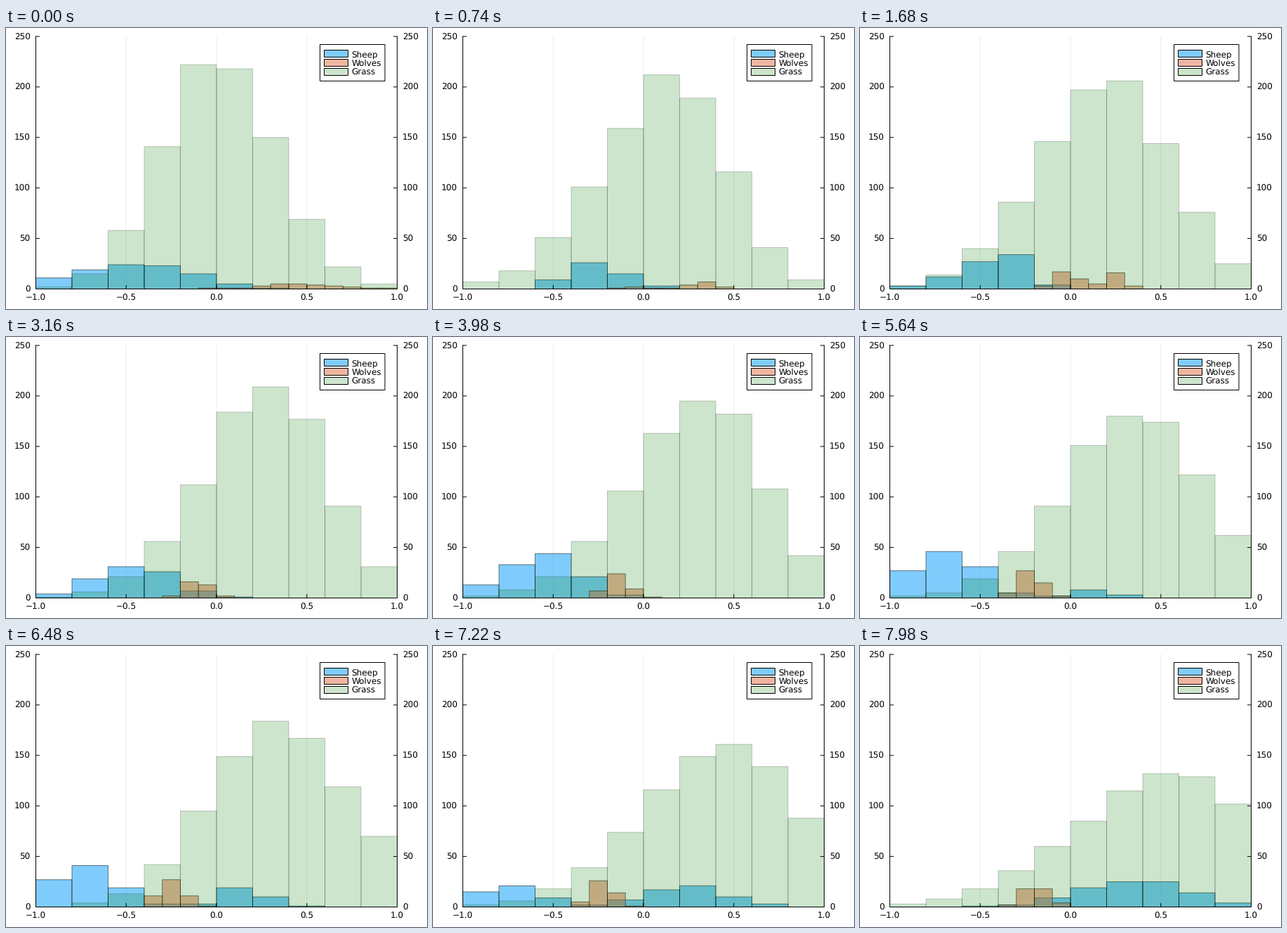
Recreate the animation shown at these times as a matplotlib script. Size 600 px wide and 400 px high, loop 8000 ms.

```python
import numpy as np
import matplotlib.pyplot as plt
from matplotlib.animation import FuncAnimation
from matplotlib.collections import LineCollection, PolyCollection
from matplotlib.patches import Rectangle

W, H, DPI = 600, 400, 100
FRAMES, INTERVAL = 400, 20
LEFT, RIGHT, TOP, BASE = 42.5, 557.5, 12, 371.5
PX = 72 / DPI  # one pixel in points
STEPS = [0, 37, 84, 158, 241, 324, 399]

plt.rcParams.update({"text.hinting": "no_hinting", "font.family": "DejaVu Sans",
                     "font.size": 12 * PX})
rng = np.random.default_rng(7)


def herd(x, peak, mode, left, right, steps=STEPS):
    """Two-sided bell over trait x; each parameter is fixed or glides between steps."""
    t = np.arange(FRAMES)
    peak, mode, left, right = (
        np.interp(t, steps, np.broadcast_to(p, len(steps)))[:, None]
        for p in (peak, mode, left, right))
    width = np.where(x < mode, left, right)
    return peak * np.exp(-0.5 * ((x - mode) / width) ** 2)


def jitter(counts):
    """Round to whole animals after a slow random wander."""
    window = np.hanning(27)
    window /= np.sqrt((window ** 2).sum())
    noise = rng.normal(0, 0.25, counts.shape)
    noise = np.array([np.convolve(col, window, "same") for col in noise.T]).T
    return np.maximum(0, np.rint(counts + noise * np.sqrt(counts)))


def centres(n):
    return (np.arange(n) + 0.5) * 2 / n - 1


wide, narrow = centres(10), centres(20)

grass = herd(wide,
             peak=[230, 210, 205, 213, 188, 182, 135],
             mode=[0, 0.18, 0.23, 0.32, 0.42, 0.32, 0.6],
             left=[0.3, 0.4, 0.4, 0.38, 0.45, 0.36, 0.55],
             right=[0.32, 0.29, 0.33, 0.29, 0.31, 0.42, 0.38])
sheep = herd(wide,
             peak=[26, 27, 36, 33, 52, 41, 0],
             mode=[-0.42, -0.29, -0.29, -0.42, -0.58, -0.7, -0.75],
             left=[0.38, 0.14, 0.27, 0.25, 0.28, 0.21, 0.21],
             right=[0.3, 0.18, 0.09, 0.18, 0.16, 0.17, 0.17])
# Late on, a second flock appears on the right
sheep += herd(wide, [0, 18, 27], [0.05, 0.1, 0.35], [0.1, 0.1, 0.3],
              [0.17, 0.17, 0.3], steps=STEPS[4:])
wolves = herd(narrow,
              peak=[1, 2, 17, 20, 25, 29, 24],
              mode=[-0.04, -0.04, -0.03, -0.12, -0.2, -0.27, -0.21],
              left=0.06, right=0.08)
# The first pack drifts left and dies out
wolves += herd(narrow, [4.5, 7, 16, 0], [0.38, 0.32, 0.25, 0.15],
               [0.13, 0.09, 0.06, 0.06], [0.28, 0.08, 0.06, 0.06], steps=STEPS[:4])

SPECIES = [
    ("Sheep", sheep, (0, 0.604, 0.98), 0.5),
    ("Wolves", wolves, (0.886, 0.435, 0.275), 0.5),
    ("Grass", grass, (0, 0.502, 0), 0.2),
]


def px(x):
    return LEFT + (x + 1) / 2 * (RIGHT - LEFT)


def py(y):
    return BASE - y / 250 * (BASE - TOP)


def bars(counts):
    edges = px(np.linspace(-1, 1, len(counts) + 1))
    return [[(a, BASE), (a, py(n)), (b, py(n)), (b, BASE)]
            for a, b, n in zip(edges, edges[1:], counts) if n > 0]


fig = plt.figure(figsize=(W / DPI, H / DPI), dpi=DPI, facecolor="white")
ax = fig.add_axes([0, 0, 1, 1])
ax.set(xlim=(0, W), ylim=(H, 0))
ax.axis("off")


def label(x, y, text, ha="left"):
    ax.text(x, y + 4.4, text, ha=ha, va="baseline", zorder=6)


def lines(segments, color, z):
    ax.add_collection(LineCollection(segments, colors=[color], linewidths=PX,
                                     capstyle="projecting", snap=False, zorder=z),
                      autolim=False)


def box(x, y, w, h, color, z):
    ax.add_patch(Rectangle((x, y), w, h, fc=color, ec="black", lw=PX,
                           snap=False, zorder=z))


# Grid, axes and ticks
lines([[(px(x), TOP), (px(x), BASE)] for x in (-0.5, 0, 0.5)], (0, 0, 0, 0.07), 1)
axes = [[(LEFT, BASE), (RIGHT, BASE)], [(LEFT, TOP), (LEFT, BASE)],
        [(RIGHT, TOP), (RIGHT, BASE)]]
for x in (-1, -0.5, 0, 0.5, 1):
    axes.append([(px(x), BASE), (px(x), BASE - 5)])
    label(px(x), 383.3, f"{x:.1f}".replace("-", "\u2212"), "center")
for y in range(0, 251, 50):
    axes.append([(LEFT, py(y)), (LEFT + 5, py(y))])
    axes.append([(RIGHT, py(y)), (RIGHT - 5, py(y))])
    label(34.7, py(y), str(y), "right")
    label(565, py(y), str(y))
lines(axes, (0, 0, 0, 1), 3)

# Legend and bar layers
box(447.5, 23.5, 92.5, 52, "white", 4)
layers = []
for i, (name, counts, rgb, alpha) in enumerate(SPECIES):
    y = 36.5 + 13 * i
    box(453.5, y - 5, 34, 10, (*rgb, alpha), 5)
    label(492.6, y + 0.3, name)
    layer = PolyCollection([], facecolors=[(*rgb, alpha)],
                           edgecolors=[(0, 0, 0, alpha)], linewidths=PX,
                           snap=False, zorder=2)
    ax.add_collection(layer, autolim=False)
    layers.append((layer, jitter(counts)))


def update(frame):
    for layer, counts in layers:
        layer.set_verts(bars(counts[frame]))
    return [layer for layer, _ in layers]


anim = FuncAnimation(fig, update, frames=FRAMES, interval=INTERVAL,
                     repeat=True, repeat_delay=0, blit=False)
plt.show()
```
